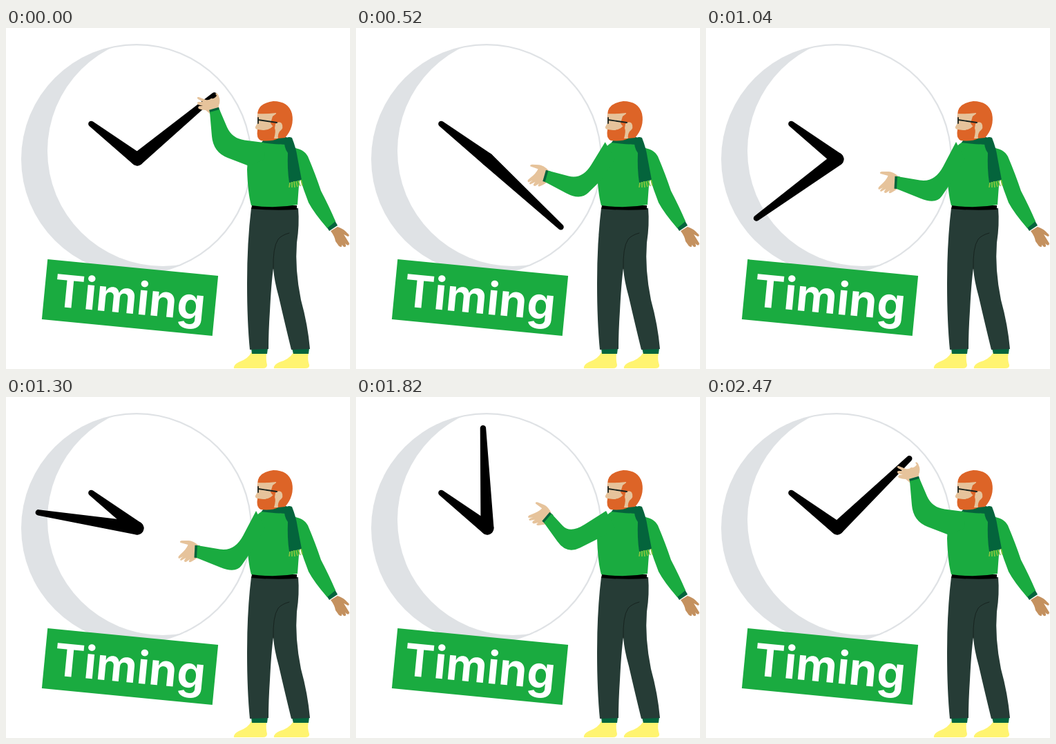
Animation of 498 by 494 pixels, one loop 2600 ms. Source, as an HTML page:

```html
<!DOCTYPE html>
<html lang="en">
<head>
<meta charset="utf-8">
<title>Timing</title>
<style>
html, body { margin: 0; width: 100%; height: 100%; overflow: hidden; background: #fff; }
svg { display: block; width: 100vw; height: 100vh; }
.green { fill: #1aab40; }
.dark { fill: #04643c; }
.hair { fill: #dd6427; }
.skin { fill: #e6c39b; }
.line { fill: none; stroke: #17231f; stroke-linecap: round; }
</style>
</head>
<body>
<svg viewBox="0 0 498 494" preserveAspectRatio="none">
  <defs><clipPath id="face"><circle cx="189" cy="190" r="164.8"/></clipPath></defs>

  <g id="clock">
    <circle cx="189" cy="190" r="167" fill="#dfe2e5"/>
    <circle cx="227" cy="178" r="167" fill="#fff" clip-path="url(#face)"/>
    <path id="hour"/>
    <path id="minute"/>
  </g>

  <g transform="translate(179.5 390.5) rotate(5.5)">
    <rect class="green" x="-124" y="-43.7" width="248" height="87.4"/>
    <text y="23" text-anchor="middle" fill="#fff" font-family="Inter, 'Open Sans', sans-serif" font-size="65" font-weight="700">Timing</text>
  </g>

  <g id="legs">
    <path fill="#fff470" d="M330 493Q329 488 337 484Q351 479 355 470H377Q376 481 378 488Q378 493 372 493ZM388 493Q387 488 396 484Q410 480 416 470H438Q436 480 439 488Q440 493 433 493Z"/>
    <path class="dark" d="M355 464H379L378 472H356ZM414 464H439L438 472H416Z"/>
    <path fill="#263c36" d="M355 261H423Q425 285 421 311Q418 350 427 394Q437 430 440 465L413 466Q403 425 395 390Q388 365 387 348Q384 370 382 410Q380 440 380 465L353 466Q349 425 349 370Q349 310 355 261Z"/>
    <path class="line" d="M387 349Q386 318 394 306Q399 300 410 297"/>
    <path d="M356 257H421V263Q388 265 355 262Z"/>
  </g>

  <g id="rightArm">
    <path fill="#c4915f" d="M470 294L480 288Q489 291 494 297Q499 301 495 302L489 299L497 312Q497 316 493 314L491 312Q494 318 489 317L486 314Q487 319 482 316L477 309Q476 302 470 294Z"/>
    <path class="dark" d="M464 288L476 279L480 286L468 294Z"/>
    <path class="green" d="M415 174Q430 174 437 186Q448 212 456 236Q468 259 477 280L465 290Q446 268 438 253Q431 235 425 216Z"/>
  </g>

  <path class="green" d="M373 164Q390 160 408 168L423 176Q430 195 424 228L422 256Q389 262 355 257Q350 239 349 205Q349 178 373 164Z"/>

  <g id="head">
    <path class="skin" d="M382 150H402L406 167Q392 171 380 162Z"/>
    <path class="dark" d="M374 160Q391 160 406 158L412 169Q390 169 370 166Z"/>
    <path class="hair" d="M364 126Q364 109 387 106Q409 106 414 124Q418 143 404 159L394 160Q385 165 369 163Q362 160 364 148Z"/>
    <path class="skin" d="M364 124Q375 125 391 123L392 136Q383 149 372 148L364 147Q360 146 361 143L365 136Z"/>
    <path class="hair" d="M386 128L394 122L397 139L386 142L383 138Z"/>
    <path class="skin" d="M390 139Q395 134 399 138Q403 145 396 150Q393 155 394 160L388 160Q391 150 389 145Z"/>
    <path class="line" stroke-width="1.8" d="M365 130V138M365 133L392 137"/>
  </g>

  <g id="scarf">
    <path class="dark" d="M403 161Q408 156 414 159Q420 174 422 188L428 220L410 224Q407 204 408 181Q402 173 403 161Z"/>
    <path fill="none" stroke="#8fc63f" stroke-width="1.6" d="M411 224L410 231M414 223L414 231M417 222L418 231M420 222L422 230M423 221L426 229M427 220L429 228"/>
  </g>

  <g id="leftArm">
    <path id="palm" class="skin"/>
    <path id="cuff" stroke="#04643c" stroke-width="7"/>
    <path id="sleeve" class="green"/>
  </g>
</svg>
<script>
const STEP = 130, STEPS = 20;
const $ = id => document.getElementById(id);
const mix = (a, b, u) => a + (b - a) * u;
const mixPoint = (p, q, u) => [mix(p[0], q[0], u), mix(p[1], q[1], u)];

const OPEN = "M2-9C-2-13-8-16-12-16L-22-16Q-26-15-24-13L-13-10Q-15-4-24 4Q-29 8-26 10L-20 7Q-27 12-23 13L-16 9Q-21 15-16 15L-10 11Q-14 16-9 15Q-5 13 2 8Z";
const GRIP = "M-7 4L-13-1Q-18-1-23-3Q-25-6-22-7L-17-7L-24-9Q-27-13-22-13L-17-13L-24-17Q-27-20-23-20L-13-16Q-8-15-5-18Q0-17 3-22L1-25Q4-27 6-21Q9-15 6-8L6 2Z";

// Each pose: upper cuff, inner elbow, shoulder, armpit, outer elbow, lower cuff.
const up = { points: [[309,118], [327,160], [373,166], [352,200], [300,180], [295,122]], turn: 44 };
const low = { points: [[281,190], [320,211], [358,166], [354,214], [308,238], [269,203]], turn: 9 };
const rest = { points: [[277,215], [331,224], [362,165], [354,225], [333,256], [276,233]], turn: 0 };
const lift = { points: [[283,169], [310,198], [362,165], [353,204], [305,228], [272,182]], turn: 22 };
const reach = { points: [[299,124], [314,163], [373,165], [352,195], [303,190], [284,130]], turn: 36 };
const poses = [[0, up], [2, low], [5, rest], [10, rest], [14, lift], [17, reach], [19, up], [20, up]];

const angles = [[-1, 46], [0, 50.3], [2, 82], [6, 185.5], [10, 279], [14, 357.6], [17, 396.6], [19, 406], [20, 410.3], [22, 442]];

// Hermite curve through the angle keys.
function minuteAngle(n) {
  let i = 1;
  while (n >= angles[i + 1][0]) i++;
  const slope = k => (angles[k + 1][1] - angles[k - 1][1]) / (angles[k + 1][0] - angles[k - 1][0]);
  const [t0, a] = angles[i], [t1, b] = angles[i + 1];
  const span = t1 - t0, u = (n - t0) / span, v = 1 - u;
  return v * v * (1 + 2 * u) * a + u * u * (3 - 2 * u) * b
    + span * u * v * (v * slope(i) - u * slope(i + 1));
}

function armPose(n) {
  let i = 0;
  while (n >= poses[i + 1][0]) i++;
  const [t0, a] = poses[i], [t1, b] = poses[i + 1], u = (n - t0) / (t1 - t0);
  return {
    points: a.points.map((p, k) => mixPoint(p, b.points[k], u)),
    turn: mix(a.turn, b.turn, u)
  };
}

const bend = (a, b, c) => `L${mixPoint(a, b, .6)}Q${b} ${mixPoint(b, c, .4)}L${c}`;

function drawArm(n) {
  const { points: [cuffTop, inner, shoulder, armpit, outer, cuffEnd], turn } = armPose(n);
  const grip = n < 2 || n > 18;
  const wrist = mixPoint(cuffTop, cuffEnd, .5);
  $("sleeve").setAttribute("d", `M${cuffTop}${bend(cuffTop, inner, shoulder)}L375 190L${armpit}${bend(armpit, outer, cuffEnd)}Z`);
  $("cuff").setAttribute("d", `M${cuffTop}L${cuffEnd}`);
  $("palm").setAttribute("d", grip ? GRIP : OPEN);
  $("palm").setAttribute("transform", `translate(${wrist}) rotate(${grip ? 0 : turn})`);
}

const turnHand = (id, angle) => $(id).setAttribute("transform", `translate(190 190) rotate(${angle})`);
const handShape = length => `M-9.5 0L-4.2 ${-length}A4.2 4.2 0 0 1 4.2 ${-length}L9.5 0A9.5 9.5 0 0 1-9.5 0Z`;

function draw(time) {
  const n = Math.floor(time / STEP) % STEPS;
  turnHand("minute", minuteAngle(n));
  drawArm(n);
}

$("hour").setAttribute("d", handShape(84));
$("minute").setAttribute("d", handShape(145));
turnHand("hour", -52.5);

const start = performance.now();
function tick() {
  draw(performance.now() - start);
  requestAnimationFrame(tick);
}
tick();
</script>
</body>
</html>
```
